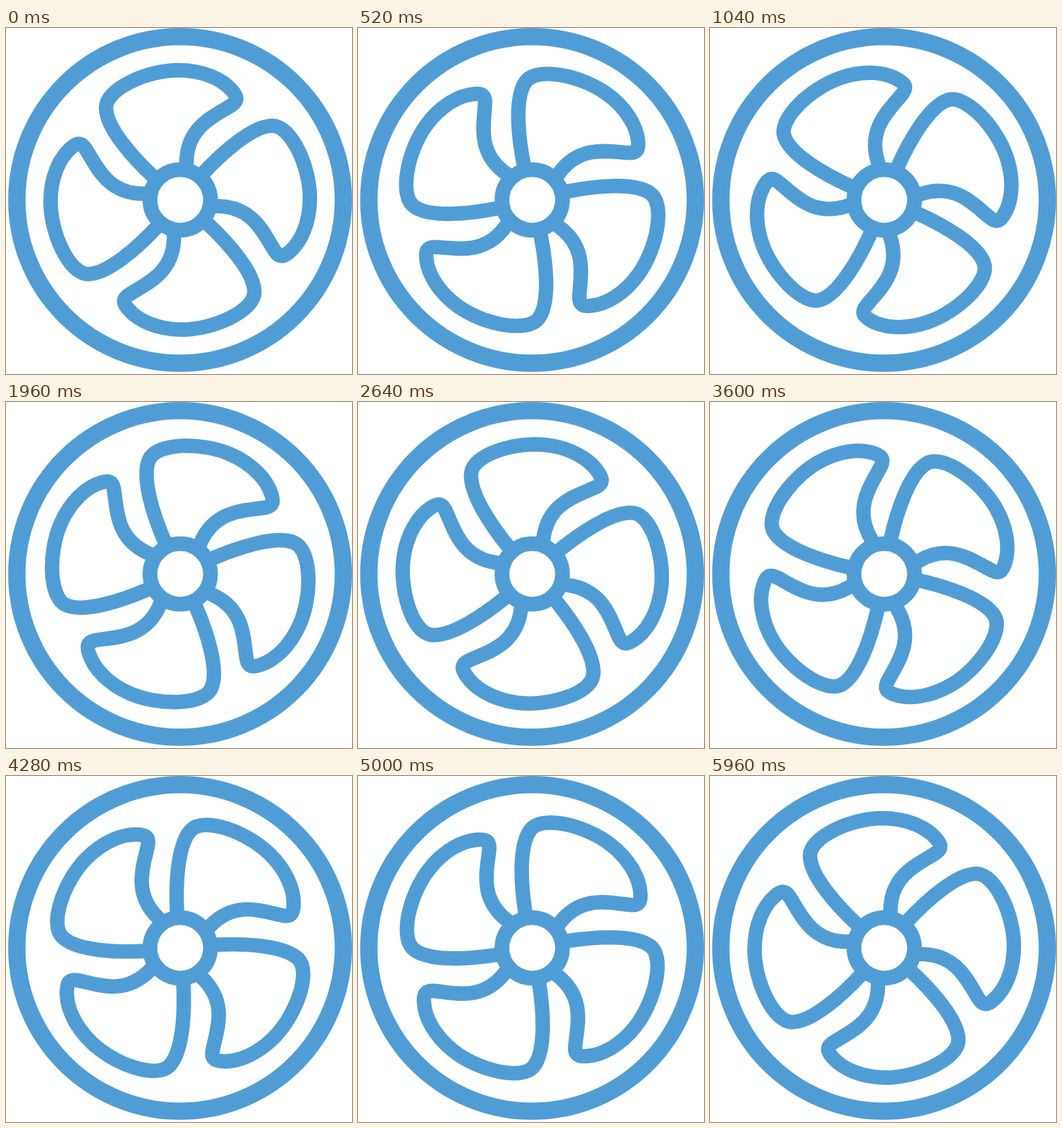
Write an HTML page that moves like this. It is 512 px wide and 512 px high and loops after 6 s.

```html
<!DOCTYPE html>
<html lang="en">
<head>
<meta charset="utf-8">
<title>Fan</title>
<style>
  html, body { margin: 0; width: 100%; height: 100%; overflow: hidden; background: #fff; }
  svg { display: block; width: 100%; height: 100%; }
</style>
</head>
<body>
<svg viewBox="0 0 512 512" fill="none" stroke="#509dd6" stroke-width="21.4">
  <defs>
    <path id="blade" stroke-linejoin="round" transform="translate(-257.8 -254.4)"
      d="M218 220C189 193 148 148 148 118C148 90 209 62.5 255 62.5C292 62.5 320 76 334 92C342 101 344 107 334 114C310 130 267 145 267 200V207"/>
  </defs>
  <circle cx="257.6" cy="254.4" r="241.6" stroke-width="25.6"/>
  <g transform="translate(257.8 254.4)">
    <g id="fan">
      <use href="#blade"/>
      <use href="#blade" transform="rotate(90)"/>
      <use href="#blade" transform="rotate(180)"/>
      <use href="#blade" transform="rotate(270)"/>
    </g>
    <circle r="44.8" stroke-width="21.8"/>
  </g>
</svg>
<script>
  const LOOP = 6000, STEP = 40, TURNS = 4;
  const last = LOOP / STEP - 1;
  const fan = document.getElementById("fan");
  const start = performance.now();

  // The final step completes the last turn, so the pose rests there for two steps.
  function draw() {
    const step = Math.floor((performance.now() - start) % LOOP / STEP);
    fan.setAttribute("transform", `rotate(${step * 360 * TURNS / last})`);
    requestAnimationFrame(draw);
  }
  draw();
</script>
</body>
</html>
```
